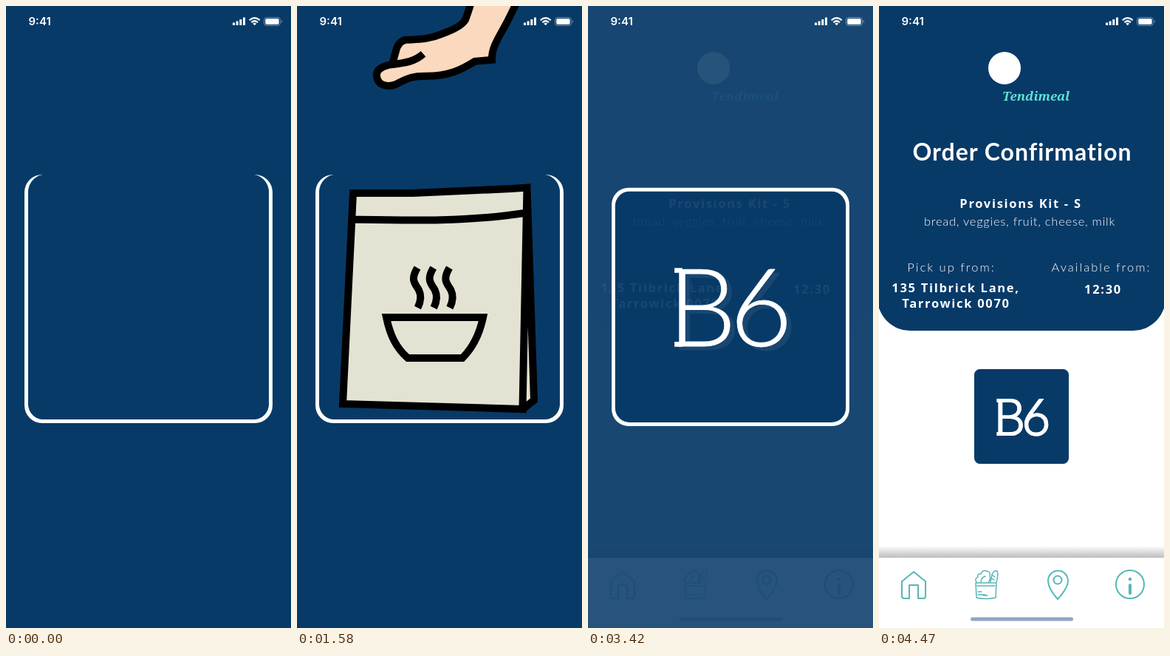
These frames come from a looping animation (386 px wide and 841 px high, 6.32 s). An HTML page:

```html
<!DOCTYPE html>
<html lang="en">
<head>
<meta charset="utf-8">
<title>Order confirmation</title>
<style>
  html, body { margin: 0; width: 100%; height: 100%; overflow: hidden; background: #083a68; }
  svg { display: block; width: 100%; height: 100%; }
  text { fill: #fff; }
  .mid { text-anchor: middle; }
  .bold { font: 700 16.5px "Noto Sans", sans-serif; letter-spacing: 1.7px; }
  .light { font: 300 16.5px Lato, sans-serif; letter-spacing: .75px; }
  .wide { letter-spacing: 2px; }
  .title { font: 700 32px Lato, sans-serif; letter-spacing: 1px; }
  .brand { font: italic 600 17px "Noto Serif", serif; fill: #5fe3d3; }
  .clock { font: 600 15px Inter, sans-serif; }
  .code { font: 300 152px Lato, sans-serif; stroke: #fff; stroke-width: var(--extra); }
  .serif { stroke: #fff; stroke-width: calc(6px + var(--extra)); }
  .ink { fill: none; stroke: #000; stroke-width: 10; }
  .paper { fill: #e4e3d3; }
  .skin { fill: #fbd9bf; stroke: #000; stroke-width: 10; }
  .icon { fill: none; stroke: #58b7b5; stroke-width: 2; stroke-linejoin: round; stroke-linecap: round; }
</style>
</head>
<body>
<svg id="stage" viewBox="0 0 386 841">
  <defs>
    <linearGradient id="shade" x1="0" y1="0" x2="0" y2="1">
      <stop offset="0" stop-opacity="0"/>
      <stop offset="1" stop-opacity=".26"/>
    </linearGradient>
    <g id="code">
      <text class="code" x="-88 -1" y="55">B6</text>
      <path class="serif" d="M-79 -52H-68M-79 52H-68"/>
    </g>
  </defs>
  <rect width="386" height="841" fill="#083a68"/>

  <rect class="fade" width="386" height="841" fill="#fff"/>
  <rect class="fade" x="-2" y="-50" width="390" height="489" rx="44" fill="#083a68"/>

  <g class="fade">
    <rect y="730" width="386" height="16" fill="url(#shade)"/>
    <rect y="746" width="386" height="95" fill="#fff"/>
    <rect x="124" y="826.5" width="139" height="5" rx="2.5" fill="#94a4c1"/>
    <g class="icon">
      <path d="M47 765L63 778V798Q63 801 60 801H53V783H41V801H34Q31 801 31 798V778Z"/>
      <path d="M242 802C232 791 229 784 229 777A13.3 13.3 0 0 1 256 777C256 784 252 791 242 802Z"/>
      <circle cx="242" cy="776" r="5.5"/>
      <circle cx="340" cy="782" r="19"/>
      <path d="M340 783V794" stroke-width="4"/>
      <circle cx="340" cy="775" r="1" stroke-width="2.5"/>
      <g stroke-width="1.5">
        <path d="M131 780H159L158 800Q145 803 132 800ZM133 784H157M134 792H139M134 796H144M141 797H147"/>
        <path d="M151 779L153 769Q155 763 160 764Q162 769 159 779M154 770L157 772M153 774L156 776"/>
        <path d="M132 779Q129 774 134 772Q133 767 138 768Q140 762 146 764Q152 765 150 771Q152 775 148 779M138 779Q138 773 144 771"/>
      </g>
    </g>
  </g>

  <rect id="frame" fill="#fff"/>
  <rect id="face" fill="#083a68"/>
  <rect id="lid" x="30" y="227.5" width="326" height="331.5" rx="24" fill="#083a68"/>

  <g fill="#fff">
    <text class="clock" x="30.5" y="26">9:41</text>
    <path d="M307 22.5h3v3.5h-3zM311.6 20.5h3v5.5h-3zM316.3 18h3v8h-3zM321 15.5h3v10.5h-3z"/>
    <path d="M329.7 19.3Q336.7 13 343.7 19.3M332.4 22.2Q336.7 18.3 341 22.2" fill="none" stroke="#fff" stroke-width="2.2"/>
    <path d="M334.3 23.7Q336.7 21.8 339.1 23.7L336.7 26.2Z"/>
    <rect x="349.5" y="15.5" width="22" height="11" rx="3.5" fill="none" stroke="#fff" opacity=".4"/>
    <rect x="351.2" y="17" width="18.5" height="8" rx="2"/>
    <path d="M373 19Q375 21 373 23Z" opacity=".5"/>
  </g>

  <g id="bag">
    <path class="paper" d="M76 253H157L290 247L311 245L321 533L306 545L62 538Z"/>
    <path class="ink" d="M76 253H157L290 247L311.5 245.5L305.5 545L62 538ZM311.5 246L321 533L306 545"/>
    <path class="ink" d="M76 288.7C150 290 230 292 308 280"/>
    <g id="bowl" class="ink">
      <path d="M121 421H252C247 445 238 462 224 476H150C134 462 126 445 121 421Z"/>
      <path id="steam" d="M163 354C153 371 160 375 165 384C169 392 168 399 163.5 408"/>
      <use href="#steam" x="21.7"/>
      <use href="#steam" x="43.4"/>
    </g>
  </g>

  <use id="codeOld" href="#code"/>
  <use id="codeNew" href="#code"/>

  <g class="fade">
    <circle cx="170" cy="84" r="22" fill="#fff"/>
    <text class="brand" x="167" y="128">Tendimeal</text>
    <g class="mid">
      <text class="bold" x="192" y="273">Provisions Kit - S</text>
      <text class="light" x="190.5" y="297">bread, veggies, fruit, cheese, milk</text>
      <text class="bold" x="104" y="387">135 Tilbrick Lane,</text>
      <text class="bold" x="104.5" y="408">Tarrowick 0070</text>
      <text class="bold" x="303.5" y="389">12:30</text>
    </g>
  </g>
  <g class="mid">
    <text id="title" class="title" x="194" y="209">Order Confirmation</text>
    <text id="pickup" class="light wide" x="98" y="359">Pick up from:</text>
    <text id="available" class="light wide" x="301" y="359">Available from:</text>
  </g>

  <g id="hand">
    <path class="skin" d="M258 -150C257 -80 255 -40 250 0C246 40 236 70 228 92Q222 102 196 111C176 119 165 118 147 119Q137 121 134 134L129 152C112 155 107 161 108 168C109 180 122 184 134 179C150 171 155 168 175 168C205 168 222 160 241 148L264 146C263 128 276 112 286 92C298 68 314 36 324 0C331 -40 331 -90 331 -150"/>
    <path class="ink" d="M171 138C160 148 148 150 127 152.5"/>
  </g>
</svg>

<script>
const LOOP = 6320;
const $ = id => document.getElementById(id);
const fading = document.querySelectorAll('.fade');
const mix = (a, b, p) => a + (b - a) * p;
const move = (id, x, y, scale = 1) =>
  $(id).setAttribute('transform', `translate(${x} ${y}) scale(${scale})`);

// cubic-bezier(0, 0, .58, 1)
function easeOut(u) {
  if (u <= 0 || u >= 1) return u <= 0 ? 0 : 1;
  let low = 0, high = 1;
  for (let i = 0; i < 24; i++) {
    const s = (low + high) / 2;
    if (1.74 * s * s * (1 - s) + s ** 3 < u) low = s; else high = s;
  }
  return 3 * low * low * (1 - low) + low ** 3;
}
const phase = (t, start, duration) => easeOut((t - start) / duration);

function setRect(id, cx, y, size, radius) {
  const box = { x: cx - size / 2, y, width: size, height: size, rx: radius };
  for (const key in box) $(id).setAttribute(key, box[key]);
}

function draw(t) {
  const drop = phase(t, 95, 925);
  const lift = phase(t, 1170, 960);
  const reveal = phase(t, 2130, 580);
  const page = phase(t, 3378, 1040);
  const away = 1 - page;

  const bagY = -580 * (1 - drop);
  move('bag', 0, bagY);
  move('hand', 0, bagY + 102 - 290 * lift);
  $('bag').style.opacity = 1 - reveal;
  $('bowl').style.opacity = (1 - reveal) ** 4;
  $('lid').style.opacity = 1 - reveal;

  const size = mix(336, 132, page), top = mix(228, 489, page);
  const border = mix(5, 2, page), radius = mix(24, 9, page);
  setRect('frame', 193, top, size, radius);
  setRect('face', 193, top + border, size - 2 * border, radius - border * .7);

  const codeY = mix(396.5, 556, page), codeScale = mix(1, .436, page);
  move('codeOld', mix(193, 194, page), codeY, codeScale);
  move('codeNew', 194 + 6 * away, codeY + 5 * away, codeScale);
  $('codeOld').style.opacity = reveal;
  $('codeNew').style.opacity = page;
  $('stage').style.setProperty('--extra', mix(.5, 5, page) + 'px');

  for (const part of fading) part.style.opacity = page;
  move('title', 0, -271 * away);
  move('pickup', -203 * away, -58 * away);
  move('available', 181 * away, -58 * away);
}

const begin = performance.now();
function tick() {
  draw((performance.now() - begin) % LOOP);
  requestAnimationFrame(tick);
}
tick();
</script>
</body>
</html>
```
